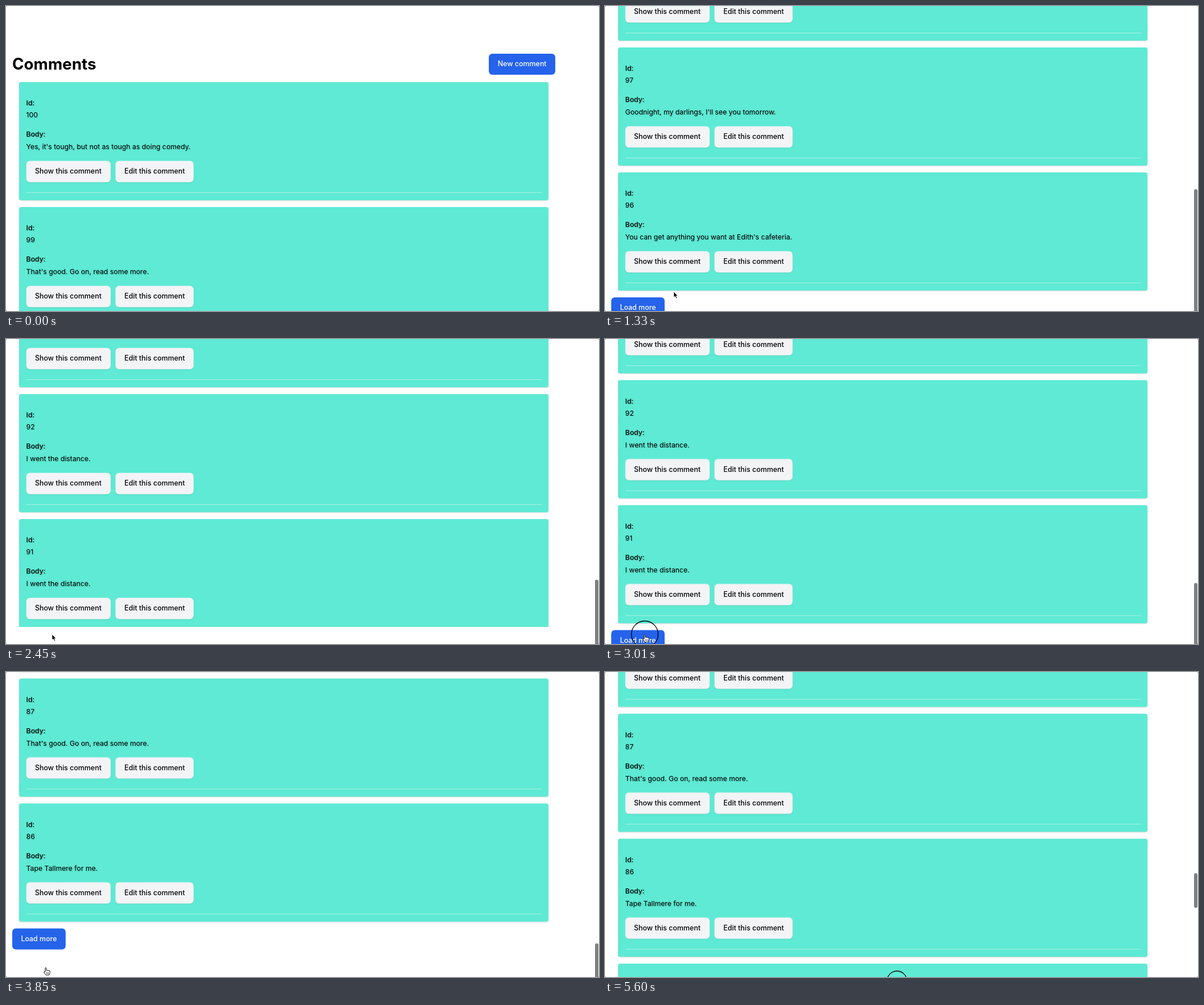
Animation of 1044 by 537 pixels, one loop 5.67 s. Source, as an HTML page:

```html
<!DOCTYPE html>
<html lang="en">
<head>
<meta charset="utf-8">
<title>Comments</title>
<style>
  html, body { margin: 0; width: 100%; height: 100%; overflow: hidden; background: #666; }
  #stage { position: relative; width: 1044px; height: 537px; overflow: hidden; background: #fff;
    border-radius: 2px; font: 12.28px/18.5px Inter, sans-serif; color: #000; }
  #page { position: absolute; left: 0; top: 0; width: 1044px; overflow: hidden; }
  h1 { position: absolute; left: 11px; top: 84px; margin: 0; font: 700 27.8px/37px Inter, sans-serif; }
  .btn { box-sizing: border-box; height: 37px; padding: 9.25px 15.4px; border-radius: 6.2px;
    font-size: 12.45px; font-weight: 500; white-space: nowrap; }
  .blue { position: absolute; background: #2563eb; color: #fff; }
  #new { right: 77px; top: 84px; }
  #more { left: 11px; }
  .card { position: absolute; box-sizing: border-box; left: 23.3px; width: 931.5px; height: 207.5px;
    padding: 27.7px 12.3px 0; border-radius: 3.5px; background: #5eead4;
    box-shadow: 0 1px 2px rgba(0, 0, 0, .15); text-shadow: 1px 1px 1px rgba(0, 0, 0, .16); }
  .card p { margin: 0 0 15.4px; }
  .card b { display: block; margin-bottom: 3.1px; font-weight: 500; }
  .row { display: flex; gap: 9.6px; }
  .row .btn { background: #f3f4f6; text-shadow: none;
    box-shadow: 0 0 0 1px rgba(243, 244, 246, .3), 0 1px 2px rgba(0, 0, 0, .14); }
  .card hr { margin: 18.5px 0 0; border: 0; height: 1px; background: #b2efe5; }
  #thumb { position: absolute; left: 1037px; top: 0; width: 5.5px; border-radius: 3px; background: #7f7f7f; }
  svg { position: absolute; left: 0; top: 0; }
</style>
</head>
<body>
<div id="stage">
  <div id="page">
    <h1>Comments</h1>
    <div id="new" class="btn blue">New comment</div>
    <div id="more" class="btn blue">Load more</div>
  </div>
  <div id="thumb"></div>
  <svg width="1044" height="537">
    <circle id="ring" fill="none" stroke="#000" stroke-width="1.3"/>
    <path id="arrow" d="M0 0V10L2.3 7.9 4 11.6 5.8 10.8 4.2 7.2H7.2Z" stroke="#fff" stroke-width=".8"/>
    <g id="hand" fill="#fff" stroke="#000" stroke-width=".9" stroke-linejoin="round">
      <path d="M-1 8V1.2Q0-.2 1 1.2V5.2Q2.2 4.3 3 5.5 4.3 4.6 5.2 5.9 7.4 5.2 7.4 7.4V9.5L6 13.5H0L-3 9Q-3.6 7-2 7.2Z"/>
      <path d="M1.2 8.8V11.6M3 8.8V11.6M4.8 8.8V11.6" stroke-width=".7"/>
    </g>
  </svg>
</div>
<script>
const LOOP = 5670, STEP = 70, TOP = 134, PITCH = 220;
const $ = id => document.getElementById(id);
const [page, more, thumb, ring, arrow, hand] = ["page", "more", "thumb", "ring", "arrow", "hand"].map($);

const bodies = [
  "Yes, it's tough, but not as tough as doing comedy.",
  "That's good. Go on, read some more.",
  "I went the distance.",
  "Goodnight, my darlings, I'll see you tomorrow.",
  "You can get anything you want at Edith's cafeteria.",
  "That's good. Go on, read some more.",
  "Yes, it's tough, but not as tough as doing comedy.",
  "Goodnight, my darlings, I'll see you tomorrow.",
  "I went the distance.",
  "I went the distance.",
  "Goodnight, my darlings, I'll see you tomorrow.",
  "Yes, it's tough, but not as tough as doing comedy.",
  "I went the distance.",
  "That's good. Go on, read some more.",
  "Tape Tallmere for me."
];

const cards = Array.from({ length: 20 }, (_, i) => {
  const card = document.createElement("div");
  card.className = "card";
  card.style.top = TOP + i * PITCH + "px";
  card.innerHTML = `<p><b>Id:</b>${100 - i}</p><p><b>Body:</b>${bodies[i % bodies.length]}</p>
    <div class="row"><div class="btn">Show this comment</div><div class="btn">Edit this comment</div></div><hr>`;
  page.append(card);
  return card;
});

// Keys are [time, ...values]
const scrollKeys = [[420, 0], [770, 765], [1190, 721], [2030, 721], [2450, 1797], [2590, 1850],
  [2940, 1821.5], [3430, 1821.5], [3850, 2982.5], [4200, 2920.5]];
const cursorKeys = [[420, 490, 552], [700, 466, 441], [1050, 466, 441], [1330, 121, 503], [1470, 81, 520],
  [2660, 81, 520], [2870, 70, 520], [4830, 70, 520], [5110, 250, 516], [5390, 514, 544]];
const loads = [1820, 3290, 4550];
const clicks = [1470, 2940, 4200, 5600];

function sample(keys, t) {
  const next = keys.findIndex(k => k[0] > t);
  if (next === 0) return keys[0].slice(1);
  if (next < 0) return keys.at(-1).slice(1);
  const a = keys[next - 1], b = keys[next];
  const u = (t - a[0]) / (b[0] - a[0]), e = u * u * (3 - 2 * u);
  return a.slice(1).map((v, i) => v + (b[i + 1] - v) * e);
}

const show = (el, on) => { el.style.display = on ? "" : "none"; };
const within = (t, from, to) => t >= from && t < to;

function draw(t) {
  const count = 5 + 5 * loads.filter(l => t >= l).length;
  const [scroll] = sample(scrollKeys, t);
  const [x, y] = sample(cursorKeys, t);

  cards.forEach((card, i) => show(card, i < count));
  show(more, count < 20);
  more.style.top = TOP + count * PITCH + "px";
  // During the second fast scroll the lower part is painted late
  page.style.height = (within(t, 2310, 2520) ? 2304 : 4700) + "px";
  page.style.transform = `translateY(${-scroll}px)`;

  const ratio = 2.239 + .401 * (count - 5);
  show(thumb, t >= 490);
  thumb.style.height = 503 / ratio + "px";
  thumb.style.transform = `translateY(${scroll / ratio + .4}px)`;

  const overButton = within(t, 1400, 1820) || within(t, 2800, 4550);
  show(arrow, !overButton);
  show(hand, overButton);
  for (const el of [arrow, hand]) el.setAttribute("transform", `translate(${x} ${y})`);

  const click = clicks.find(c => within(t, c, c + 210));
  show(ring, click !== undefined);
  ring.setAttribute("cx", x);
  ring.setAttribute("cy", y);
  ring.setAttribute("r", click === undefined ? 0 : 17.5 + (t - click) / STEP * 6);
}

const start = performance.now();
function frame() {
  const t = (performance.now() - start) % LOOP;
  draw(Math.floor(t / STEP) * STEP);
  requestAnimationFrame(frame);
}
frame();
</script>
</body>
</html>
```
